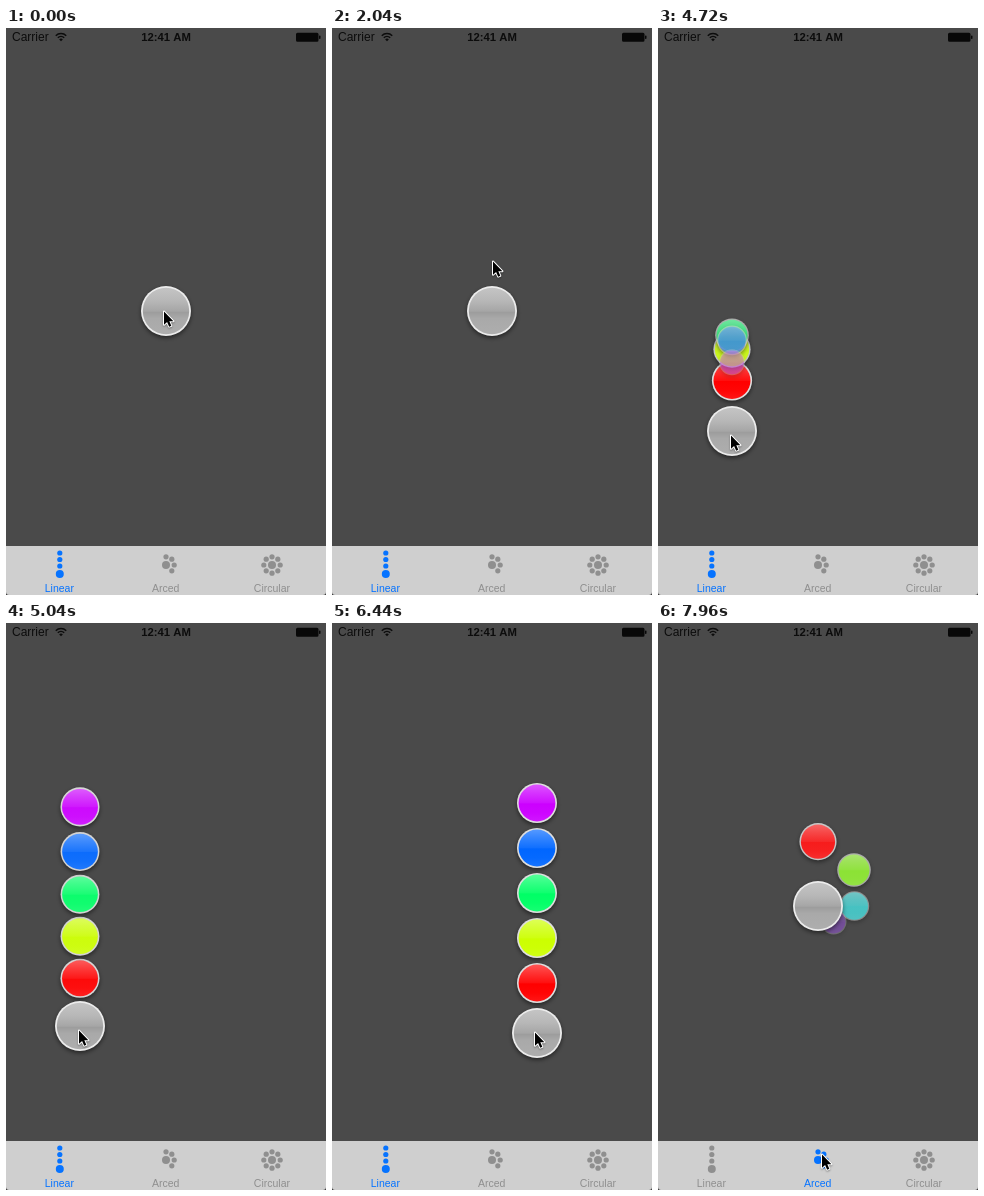
These frames come from a looping animation (320x567 px, 8 s). An HTML page with a canvas:

```html
<!DOCTYPE html>
<html lang="en">
<head>
<meta charset="utf-8">
<title>Menu demo</title>
<style>
html, body { margin: 0; width: 100%; height: 100%; overflow: hidden; background: #4a4a4a; }
canvas { display: block; width: 320px; height: 567px; }
</style>
</head>
<body>
<canvas id="stage"></canvas>
<script>
const W = 320, H = 567, LOOP = 8000, TAU = Math.PI * 2;
const FONT = '"Liberation Sans", Arial, sans-serif';
const canvas = document.getElementById('stage');
const ctx = canvas.getContext('2d');
const dpr = window.devicePixelRatio || 1;
canvas.width = W * dpr;
canvas.height = H * dpr;

const STAGGER = 19.5;

const BUTTON = [
  [3080, 160, 283], [3840, 74, 403],
  [5400, 74, 403], [5460, 83, 410], [5756, 205, 410]
];
const CURSOR = [
  [380, 157, 282], [860, 156, 225], [1800, 156, 225], [2000, 160, 232],
  [2080, 160, 232], [2520, 157, 283], [2640, 157, 283], [2840, 158, 286],
  [3080, 158, 286], [3800, 72, 406], [5310, 72, 406], [5761, 202, 408],
  [7100, 202, 408], [7640, 163, 530]
];

const clamp = v => Math.max(0, Math.min(1, v));
const ease = u => (1 - Math.cos(Math.PI * clamp(u))) / 2;

function track(keys, t) {
  let a = keys[0];
  for (const b of keys) {
    if (t < b[0]) {
      const k = b === a ? 0 : ease((t - a[0]) / (b[0] - a[0]));
      return [a[1] + (b[1] - a[1]) * k, a[2] + (b[2] - a[2]) * k];
    }
    a = b;
  }
  return [a[1], a[2]];
}

// underdamped spring from 0 to 1
function spring(ms) {
  if (ms <= 0) return 0;
  const q = ms * 0.0154;
  return 1 - Math.exp(-0.45 * q) * (Math.cos(q) + 0.45 * Math.sin(q));
}

function progress(t, i, open, close) {
  return spring(t - open - i * STAGGER) * (1 - ease((t - close) / 300));
}

function disc(x, y, r, fill) {
  ctx.fillStyle = fill;
  ctx.beginPath();
  ctx.arc(x, y, r, 0, TAU);
  ctx.fill();
}

function bead(x, y, r, line, stops, rim) {
  const g = ctx.createLinearGradient(0, y - r, 0, y + r);
  stops.forEach(([at, color]) => g.addColorStop(at, color));
  ctx.save();
  ctx.shadowColor = 'rgba(0,0,0,0.5)';
  ctx.shadowBlur = 4 * dpr;
  ctx.shadowOffsetY = 2 * dpr;
  disc(x, y, r, rim);
  ctx.restore();
  disc(x, y, r - line, g);
}

function item(hue, x, y, scale, alpha) {
  const tint = l => `hsl(${hue},100%,${l}%)`;
  ctx.globalAlpha = alpha;
  bead(x, y, 20 * scale, 1.6 * scale,
    [[0, tint(68)], [0.25, tint(60)], [0.5, tint(53)], [0.52, tint(50)], [0.75, tint(51)], [1, tint(55)]], '#dedede');
  ctx.globalAlpha = 1;
}

// hues are spread evenly over the items
function fan(t, cx, cy, open, close, count, place, blown = []) {
  for (let i = 0; i < count; i++) {
    const p = progress(t, i, open, close);
    const b = i === blown[0] ? clamp((t - blown[1]) / 300) : 0;
    if (p < 0.03 || b === 1) continue;
    const [dx, dy] = place(i);
    const q = b > 0 ? 1 : p;
    item(360 * i / count, cx + dx * q, cy + dy * q, (0.5 + 0.5 * q) * (1 + b), clamp(q) * (1 - b));
  }
}

const linear = i => [0, -50 - 45 * i];
const arced = i => {
  const a = (i - 2) * Math.PI / 4;
  return [75 * Math.cos(a), 75 * Math.sin(a)];
};

function menu(t) {
  const arc = t >= 7800;
  const [x, y] = arc ? [160, 283] : track(BUTTON, t);
  if (arc) fan(t, x, y, 7850, 9000, 4, arced);
  else if (t < 3000) fan(t, x, y, 150, 1580, 5, linear, [0, 1500]);
  else fan(t, x, y, 4590, 6960, 5, linear);
  bead(x, y, 25, 1.8,
    [[0, '#c6c6c6'], [0.3, '#b7b7b7'], [0.5, '#a6a6a6'], [0.53, '#9d9d9d'], [0.65, '#a9a9a9'], [1, '#aeaeae']], '#ececec');
}

function text(str, x, y, font, color, align) {
  ctx.font = `${font} ${FONT}`;
  ctx.fillStyle = color;
  ctx.textAlign = align;
  ctx.fillText(str, x, y);
}

function statusBar() {
  text('Carrier', 6, 13, '12px', '#0c0c0c', 'left');
  text('12:41 AM', 160, 13, 'bold 11.3px', '#0c0c0c', 'center');
  ctx.strokeStyle = '#0c0c0c';
  ctx.lineWidth = 1.5;
  for (const r of [4.5, 7.4]) {
    ctx.beginPath();
    ctx.arc(55, 13, r, Math.PI * 1.25, Math.PI * 1.75);
    ctx.stroke();
  }
  ctx.fillStyle = '#0c0c0c';
  ctx.beginPath();
  ctx.moveTo(55, 13.3);
  ctx.arc(55, 13.3, 2.6, Math.PI * 1.25, Math.PI * 1.75);
  ctx.fill();
  ctx.fillStyle = '#080808';
  ctx.beginPath();
  ctx.roundRect(290, 4.7, 22.5, 9, 1.5);
  ctx.roundRect(313, 7.5, 1.5, 3.4, 0.7);
  ctx.fill();
}

function ring(x, y, from, count, color) {
  disc(x, y, 4, color);
  for (let k = 0; k < count; k++) {
    const a = (from + k) * Math.PI / 4;
    disc(x + 8.2 * Math.cos(a), y + 8.2 * Math.sin(a), 2.6, color);
  }
}

function tabBar(active) {
  ctx.fillStyle = '#cfcfcf';
  ctx.fillRect(0, 518, W, 49);
  const color = i => i === active ? '#0673ff' : '#8f8f8f';
  for (const y of [525, 531.5, 538]) disc(53.8, y, 2.6, color(0));
  disc(53.8, 546, 4, color(0));
  ring(160, 537, -2, 4, color(1));
  ring(266, 537, 0, 8, color(2));
  ['Linear', 'Arced', 'Circular'].forEach((name, i) =>
    text(name, 53.3 + i * 106.3, 563.5, '10.5px', color(i), 'center'));
  ctx.fillStyle = '#333';
  for (const [x, s] of [[0, 1], [W, -1]]) {
    ctx.beginPath();
    ctx.moveTo(x, H - 3);
    ctx.quadraticCurveTo(x, H, x + 3 * s, H);
    ctx.lineTo(x, H);
    ctx.fill();
  }
}

const arrow = new Path2D('M0 0V13.3L3.1 10.5L5.2 15.2L7.3 14.3L5.3 9.7H9.4Z');

function cursor(t) {
  const [x, y] = track(CURSOR, t);
  ctx.save();
  ctx.translate(x + 1, y + 1.5);
  ctx.lineJoin = 'round';
  ctx.lineWidth = 2;
  ctx.strokeStyle = '#fff';
  ctx.shadowColor = 'rgba(0,0,0,0.35)';
  ctx.shadowBlur = 2 * dpr;
  ctx.shadowOffsetY = dpr;
  ctx.stroke(arrow);
  ctx.shadowColor = 'transparent';
  ctx.fillStyle = '#000';
  ctx.fill(arrow);
  ctx.restore();
}

function draw(t) {
  ctx.setTransform(dpr, 0, 0, dpr, 0, 0);
  ctx.fillStyle = '#4a4a4a';
  ctx.fillRect(0, 0, W, H);
  menu(t);
  statusBar();
  tabBar(t >= 7800 ? 1 : 0);
  cursor(t);
}

const start = performance.now();
function loop() {
  draw((performance.now() - start) % LOOP);
  requestAnimationFrame(loop);
}
loop();
</script>
</body>
</html>
```
